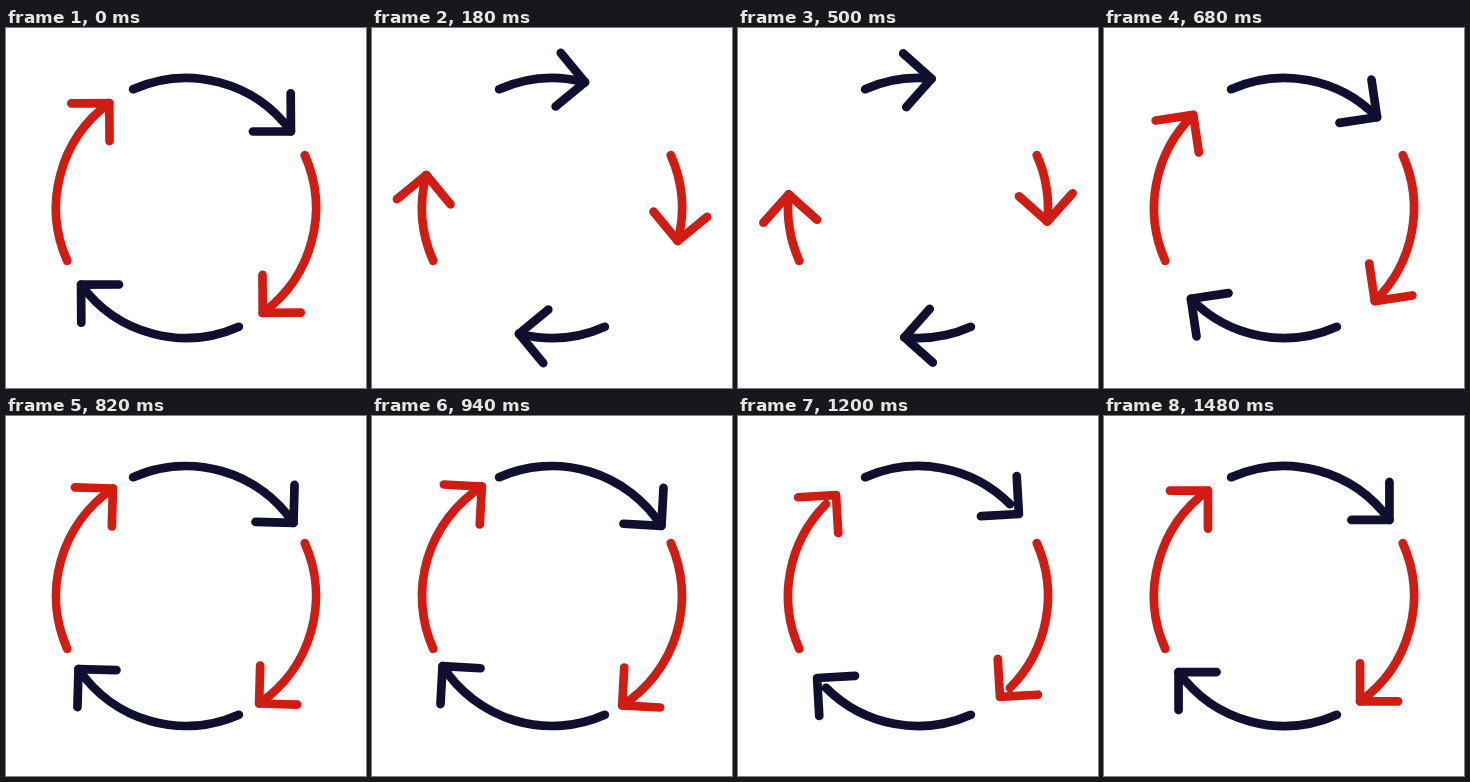
Recreate the animation shown at these times as an HTML page with a canvas. Size 360x360 px, loop 1.52 s.

```html
<!DOCTYPE html>
<html lang="en">
<head>
<meta charset="utf-8">
<title>Cycle arrows</title>
<style>
  html, body { margin: 0; width: 100%; height: 100%; overflow: hidden; background: #fff; }
  canvas { display: block; width: 360px; height: 360px; }
</style>
</head>
<body>
<canvas id="stage" width="360" height="360"></canvas>
<script>
const ctx = document.getElementById('stage').getContext('2d');
const LOOP = 1520, RADIUS = 130, ARM = 38;
const COLORS = ['#100f30', '#d01d14'];
const TAIL = -24, REST = 54.2; // degrees clockwise from the top

// [time in ms, arc end, head angle], eased out between keys
const KEYS = [
  [0, REST, REST],
  [520, 6, 6],
  [1040, 57.4, 57.4],
  [1240, 45, 50.9],
  [1500, REST, REST],
  [LOOP, REST, REST]
];

const rad = deg => deg * Math.PI / 180;
const easeOut = p => 1 - (1 - p) ** 4;

function pose(t) {
  const i = KEYS.findIndex(key => t < key[0]);
  const from = KEYS[i - 1], to = KEYS[i];
  const p = easeOut((t - from[0]) / (to[0] - from[0]));
  return [1, 2].map(k => from[k] + (to[k] - from[k]) * p);
}

function drawArrow(arcEnd, headAngle) {
  ctx.beginPath();
  ctx.arc(0, 0, RADIUS, rad(TAIL - 90), rad(arcEnd - 90));
  ctx.stroke();

  ctx.save();
  ctx.rotate(rad(headAngle - REST));
  const x = RADIUS * Math.sin(rad(REST)), y = -RADIUS * Math.cos(rad(REST));
  ctx.beginPath();
  ctx.moveTo(x, y - ARM);
  ctx.lineTo(x, y);
  ctx.lineTo(x - ARM, y);
  ctx.stroke();
  ctx.restore();
}

function draw(now) {
  const [arcEnd, headAngle] = pose(now % LOOP);
  ctx.setTransform(1, 0, 0, 1, 0, 0);
  ctx.fillStyle = '#fff';
  ctx.fillRect(0, 0, 360, 360);
  ctx.translate(180, 180);
  ctx.lineWidth = 8.7;
  ctx.lineCap = ctx.lineJoin = 'round';
  for (let i = 0; i < 4; i++) {
    ctx.strokeStyle = COLORS[i % 2];
    drawArrow(arcEnd, headAngle);
    ctx.rotate(Math.PI / 2);
  }
}

const start = performance.now();
function tick() {
  draw(performance.now() - start);
  requestAnimationFrame(tick);
}
tick();
</script>
</body>
</html>
```
